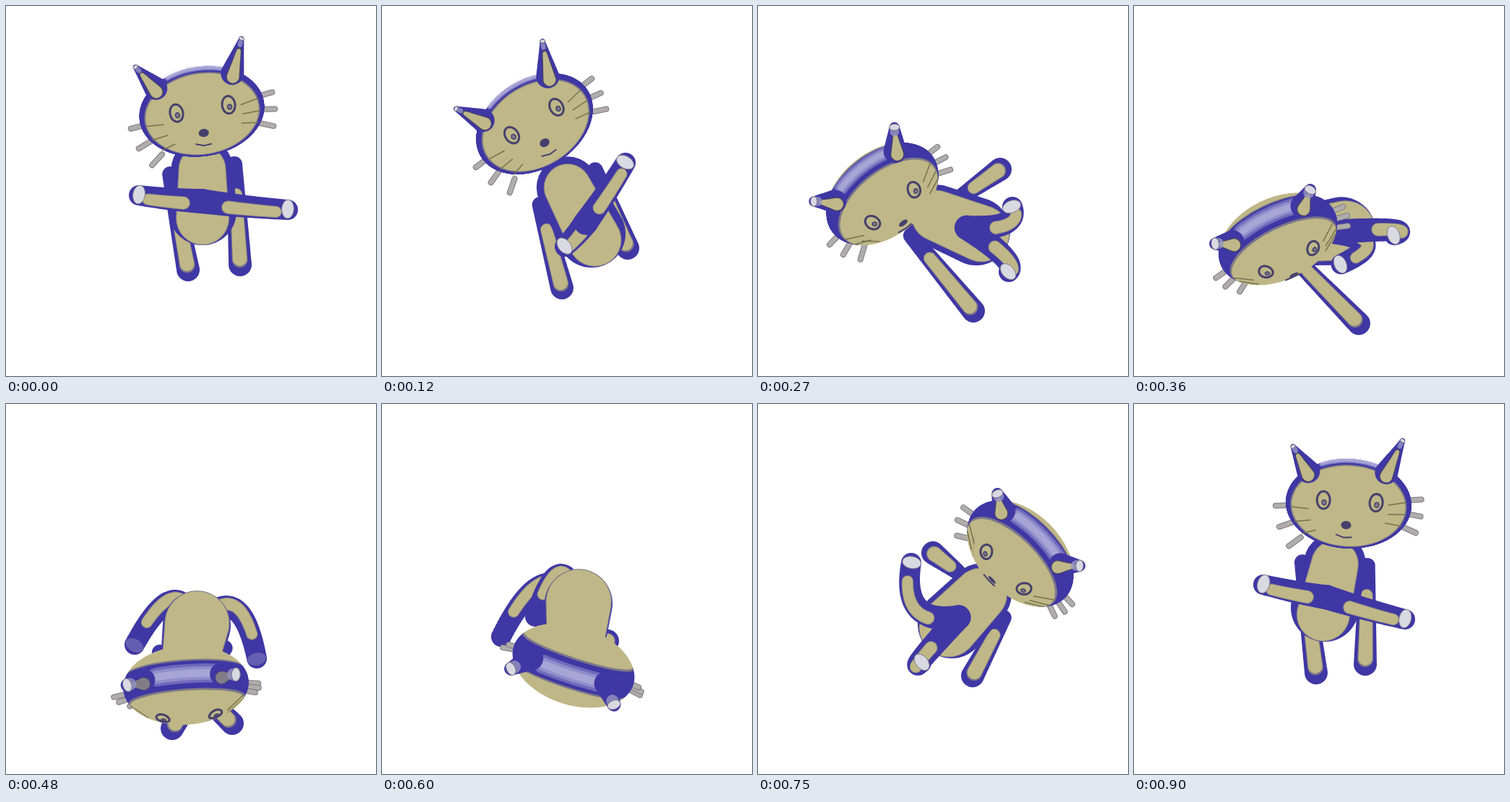
Animation, 512 px wide and 512 px high, one loop 0.93 s. Source, as an HTML page with a canvas:

```html
<!DOCTYPE html>
<html lang="en">
<head>
<meta charset="utf-8">
<title>Tumbling cat</title>
<style>
html, body { margin: 0; width: 100%; height: 100%; overflow: hidden; background: #fff; }
canvas { display: block; width: 100vw; height: 100vh; }
</style>
</head>
<body>
<canvas id="stage" width="512" height="512"></canvas>
<script>
const ctx = document.getElementById('stage').getContext('2d');
const BLUE = '#3f37a4', TAN = '#bfb787', SEAM = '#7d7888', PALE = '#d9d9e2', GREY = '#b0adaa', INK = '#45416c';
const LOOP = 930, STEP = 30, RAD = Math.PI / 180;
const RX = 87, RY = 62, RZ = 54;

// Key points: the head also has roll and pitch in degrees; limbs give the end only.
const times = [0, 120, 270, 480, 600, 750, 900];
const tracks = {
  head: [[271,146,-9,8], [211,163,-32,8], [172,260,-38,40], [249,389,-4,75], [265,362,18,102], [363,207,45,52], [297,138,3,8]],
  hip: [[272,284], [290,315], [302,312], [264,306], [272,276], [268,305], [264,282]],
  legL: [[184,262], [253,333], [347,368], [178,333], [165,322], [212,220], [179,250]],
  legR: [[390,282], [337,217], [352,278], [347,352], [212,294], [226,358], [375,298]],
  armL: [[252,365], [249,390], [298,422], [313,442], [270,345], [242,206], [252,372]],
  armR: [[324,358], [340,335], [335,226], [230,449], [312,328], [297,376], [320,360]]
};

const mix = (a, b, k = .5) => [a[0] + (b[0] - a[0]) * k, a[1] + (b[1] - a[1]) * k];
const shift = (p, d, k) => [p[0] + d[0] * k, p[1] + d[1] * k];
const clamp = v => Math.max(0, Math.min(1, v));

// Cubic interpolation through the key points, closed over the loop.
function sample(rows, t) {
  const n = times.length;
  let i = n - 1;
  while (times[i] > t) i--;
  const at = k => times[(k + n) % n] + LOOP * Math.floor(k / n);
  const row = k => rows[(k + n) % n];
  const h = at(i + 1) - at(i), u = (t - at(i)) / h;
  const p0 = row(i - 1), p1 = row(i), p2 = row(i + 1), p3 = row(i + 2);
  const h0 = h / (at(i + 1) - at(i - 1)), h1 = h / (at(i + 2) - at(i));
  return p1.map((a, k) => {
    const b = p2[k], m = (b - p0[k]) * h0, q = (p3[k] - a) * h1;
    return a + u * (m + u * (3 * (b - a) - 2 * m - q + u * (2 * (a - b) + m + q)));
  });
}

// Round tube of changing radius along a curve from a to b, bent towards k.
function tube(a, k, b, r0, r1, fill, from = 0, to = 1) {
  ctx.beginPath();
  for (let i = 0; i <= 48; i++) {
    const u = from + (to - from) * i / 48, r = r0 + (r1 - r0) * u;
    const [x, y] = mix(mix(a, k, u), mix(k, b, u), u);
    ctx.moveTo(x + r, y);
    ctx.arc(x, y, r, 0, 7);
  }
  ctx.fillStyle = fill;
  ctx.fill();
}

function path(points, { fill, edge, width = 1.5 }) {
  ctx.beginPath();
  points.forEach(p => ctx.lineTo(p[0], p[1]));
  if (fill) { ctx.closePath(); ctx.fillStyle = fill; ctx.fill(); }
  if (edge) { ctx.strokeStyle = edge; ctx.lineWidth = width; ctx.stroke(); }
}

function cap(p, from, r) {
  ctx.beginPath();
  ctx.ellipse(p[0], p[1], r * .65, r, Math.atan2(p[1] - from[1], p[0] - from[0]), 0, 7);
  ctx.fillStyle = PALE;
  ctx.fill();
  ctx.strokeStyle = SEAM;
  ctx.lineWidth = 1;
  ctx.stroke();
}

function arm(root, end) {
  const k = mix(root, end);
  tube(root, k, end, 11, 16, BLUE);
  tube(root, k, end, 8, 11, SEAM, .3, .95);
  tube(root, k, end, 7, 10, TAN, .3, .94);
}

function leg(root, end, away, bend, tip) {
  const k = shift(mix(root, end), away, 110 * bend), off = p => shift(p, away, 4);
  tube(root, k, end, 17, 14, BLUE);
  tube(off(root), off(k), off(end), 10, 8, SEAM, .3, .86);
  tube(off(root), off(k), off(end), 9, 7, TAN, .3, .86);
  ctx.globalAlpha = tip;
  cap(shift(end, away, -1), k, 13);
  ctx.globalAlpha = 1;
}

function torso(neck, hip, away, cos) {
  const inset = 11 * Math.abs(cos), low = shift(hip, away, inset * .9);
  tube(neck, mix(neck, hip), hip, 43, 47, BLUE);
  tube(neck, mix(neck, low), low, 44 - inset, 48 - inset, SEAM);
  tube(neck, mix(neck, low), low, 43 - inset, 47 - inset, TAN);
}

function drawHead([x, y, roll, pitch]) {
  const cos = Math.cos(pitch * RAD), sin = Math.sin(pitch * RAD);
  const project = (px, py, pz) => [px, py * cos + pz * sin];
  // Point on the front of the head, with how far it turns towards the viewer.
  const onFace = (px, py) => {
    const z = Math.sqrt(Math.max(0, 1 - (px / RX) ** 2 - (py / RY) ** 2));
    const n = [px / RX / RX, py / RY / RY, z / RZ];
    return [...project(px, py, z * RZ), (n[2] * cos - n[1] * sin) / Math.hypot(...n)];
  };
  const spot = (px, py, rx, ry, style) => path(Array.from({ length: 25 }, (_, i) =>
    onFace(px + rx * Math.cos(i * Math.PI / 12), py + ry * Math.sin(i * Math.PI / 12))), style);
  const fade = (px, py) => ctx.globalAlpha = clamp(onFace(px, py)[2] * 5);

  ctx.save();
  ctx.translate(x, y);
  ctx.rotate(roll * RAD);

  const whiskers = [];
  for (const side of [-1, 1])
    for (let i = 0; i < 3; i++) {
      const a = (side < 0 ? 4 + 17 * i : -7 + 13.5 * i) * RAD;
      whiskers.push([side * 101 * Math.cos(a), 101 * Math.sin(a)]);
    }
  for (const [wx, wy] of whiskers) {
    const a = project(wx * .8, wy * .8, 5), b = project(wx, wy, 8);
    path([a, b], { edge: SEAM, width: 8 });
    path([a, b], { edge: GREY, width: 6 });
  }

  // Stacked discs make a rounded head: tan back, blue rim, tan face.
  const front = cos < 0 ? -1 : 1;
  for (let i = 0; i <= 80; i++) {
    const z = front * (i / 40 - 1), s = Math.sqrt(1 - z * z), d = Math.abs(z);
    ctx.beginPath();
    ctx.ellipse(0, z * RZ * sin, RX * s, Math.max(RY * s * Math.abs(cos), 2), 0, 0, 7);
    ctx.fillStyle = d > .42 ? TAN : d > .37 ? SEAM : BLUE;
    ctx.fill();
  }

  const crown = Array.from({ length: 17 }, (_, i) => {
    const px = -40 + i * 5;
    return project(px, -RY * .98 * Math.sqrt(1 - (px / RX) ** 2), 0);
  });
  for (const k of [1, .7, .4]) path(crown, { edge: 'rgba(215,215,235,.32)', width: k * (5 + 22 * sin) });

  for (const [base, tip] of [[[-58, -42], [-81, -78]], [[50, -46], [70, -94]]]) {
    const a = project(...base, 0), b = project(...tip, 15), m = mix(a, b), r = 2.5 + 7 * sin;
    tube(a, m, b, 16, r, BLUE);
    ctx.globalAlpha = clamp(cos * 2);
    const low = shift(a, [0, 1], 5);
    tube(low, mix(low, b), b, 10, 1, INK, 0, .7);
    tube(low, mix(low, b), b, 8.5, 0, TAN, 0, .68);
    ctx.globalAlpha = 1;
    tube(a, m, b, r, r * .9, 'rgba(150,148,195,.8)', .82, .9);
    cap(b, a, r);
  }

  for (const ex of [-35, 38]) {
    fade(ex, -10);
    spot(ex, -10, 9, 12, { fill: TAN, edge: INK, width: 3 });
    spot(ex + 1, -7, 3, 3.5, { fill: SEAM, edge: INK });
  }
  fade(-2, 23);
  spot(-2, 23, 7, 6, { fill: INK });
  path([onFace(-15, 38), onFace(-4, 42), onFace(6, 41)], { edge: INK, width: 2 });
  for (const [wx, wy] of whiskers) {
    fade(wx * .65, wy * .5);
    path([onFace(wx * .78, wy * .72), onFace(wx * .55, wy * .55)], { edge: '#77714f' });
  }
  ctx.restore();
}

function draw(t) {
  const p = {};
  for (const name in tracks) p[name] = sample(tracks[name], t);
  const [x, y, roll, pitch] = p.head, cos = Math.cos(pitch * RAD);
  const side = [Math.cos(roll * RAD), Math.sin(roll * RAD)];
  const span = Math.hypot(p.hip[0] - x, p.hip[1] - y);
  const away = [(p.hip[0] - x) / span, (p.hip[1] - y) / span];
  const neck = mix(p.hip, p.head, .42), lap = mix(p.hip, p.head, .1);
  const bend = 1 - cos * cos, tip = clamp((80 - pitch) / 20);
  const legs = () => [p.legL, p.legR].forEach(end => leg(lap, end, away, bend, tip));

  ctx.fillStyle = '#fff';
  ctx.fillRect(0, 0, 512, 512);
  ctx.lineCap = ctx.lineJoin = 'round';
  arm(shift(neck, side, -45), p.armL);
  arm(shift(neck, side, 45), p.armR);
  const behind = pitch > 60;
  if (behind) legs();
  torso(neck, p.hip, away, cos);
  if (!behind) legs();
  drawHead(p.head);
}

const start = performance.now();
function tick() {
  const t = (performance.now() - start) % LOOP;
  draw(t < 2 * STEP ? 0 : Math.floor(t / STEP) * STEP);
  requestAnimationFrame(tick);
}
tick();
</script>
</body>
</html>
```
